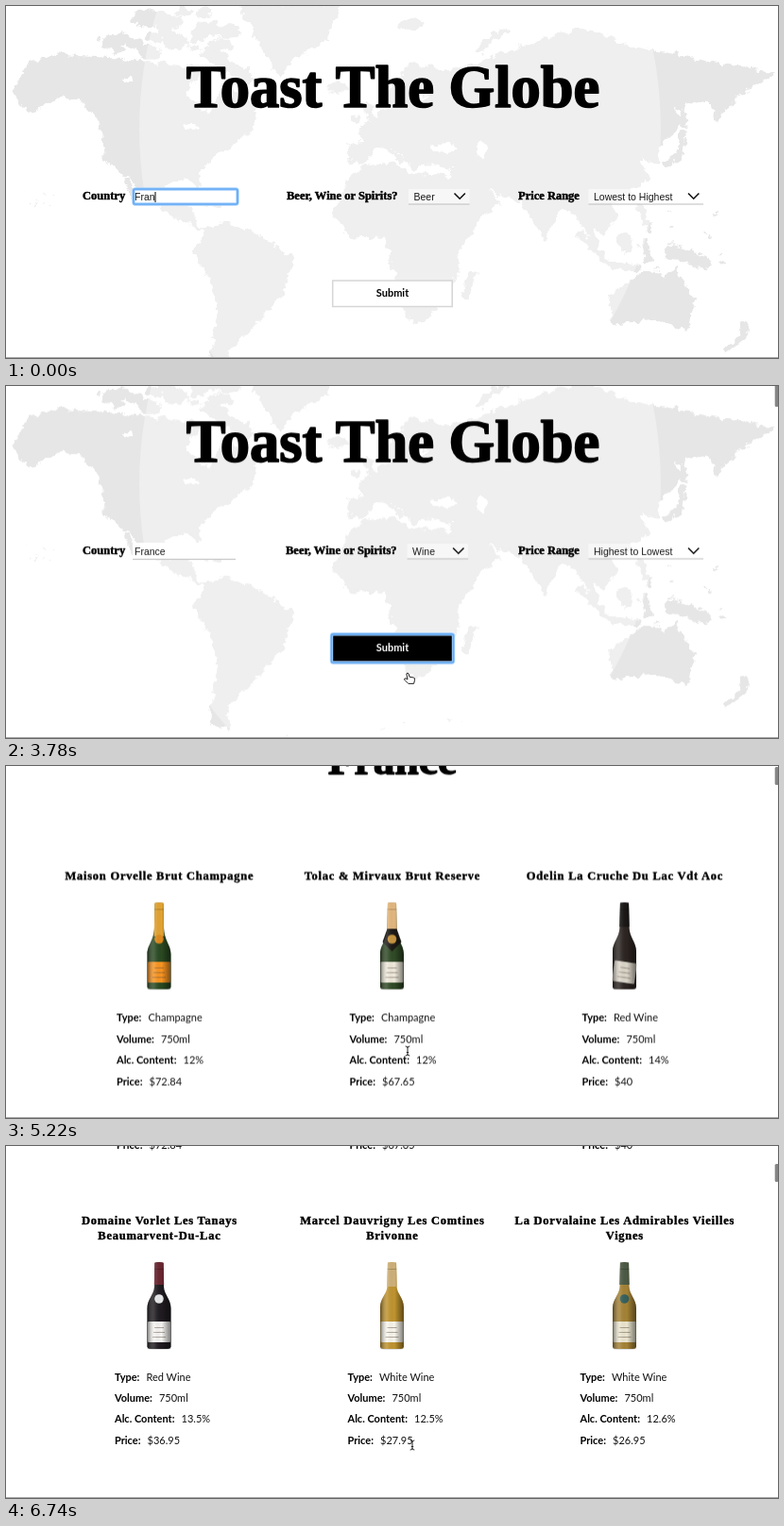
Write an HTML page that moves like this. It is 817 by 373 pixels and loops after 6.76 s.

```html
<!DOCTYPE html>
<html lang="en">
<head>
<meta charset="utf-8">
<title>Toast The Globe</title>
<style>
  html, body { margin: 0; width: 100%; height: 100%; overflow: hidden; background: #fff; }
  #stage { position: relative; width: 817px; height: 373px; overflow: hidden; background: #fff; }
  svg { position: absolute; left: 0; top: 0; display: block; }
  #page { position: absolute; left: 0; top: 0; width: 817px; height: 1250px; will-change: transform; }
  .serif { font-family: "Liberation Serif", "Times New Roman", serif; font-weight: 700; stroke: #000; stroke-linejoin: round; }
  .title { font-size: 62.5px; stroke-width: 1.7px; }
  .head { font-size: 45.5px; stroke-width: 1.3px; }
  .label { font-size: 12.5px; stroke-width: .45px; }
  .name { font-size: 12.5px; stroke-width: .4px; letter-spacing: .75px; }
  .field { font-family: "Liberation Sans", Arial, sans-serif; font-size: 10.5px; fill: #1a1a1a; }
  .info { font-family: Lato, sans-serif; font-size: 11px; fill: #111; }
  .bold { font-weight: 700; fill: #000; }
  .mid { text-anchor: middle; }
</style>
</head>
<body>
<div id="stage">
  <div id="page">
    <svg id="map" width="817" height="430">
      <filter id="coast" x="0" y="0" width="817" height="430" filterUnits="userSpaceOnUse" color-interpolation-filters="sRGB">
        <feTurbulence type="fractalNoise" baseFrequency=".11" numOctaves="4" seed="4"/>
        <feDisplacementMap in="SourceGraphic" scale="11" xChannelSelector="R" yChannelSelector="G"/>
      </filter>
    </svg>
    <svg id="ui" width="817" height="1250">
      <linearGradient id="shade">
        <stop offset="0" stop-opacity=".5"/>
        <stop offset=".3" stop-color="#fff" stop-opacity=".14"/>
        <stop offset=".6" stop-opacity="0"/>
        <stop offset="1" stop-opacity=".5"/>
      </linearGradient>
    </svg>
  </div>
  <svg id="top" width="817" height="373"></svg>
</div>
<script>
const LOOP = 6760;
const $ = id => document.getElementById(id);

function add(parent, tag, attrs = {}, text) {
  const el = document.createElementNS("http://www.w3.org/2000/svg", tag);
  for (const k in attrs) el.setAttribute(k, attrs[k]);
  if (text !== undefined) el.textContent = text;
  parent.append(el);
  return el;
}
const rect = (p, x, y, width, height, fill, more) => add(p, "rect", { x, y, width, height, fill, ...more });
const label = (p, x, y, cls, str, more) => add(p, "text", { x, y, class: cls, ...more }, str);
const show = (el, on) => el.setAttribute("visibility", on ? "visible" : "hidden");

let seed = 11;
function random(min, max) {
  seed = seed * 16807 % 2147483647;
  return min + (max - min) * seed / 2147483647;
}

// ---- World map: rough outlines, frayed by noise ----
const LAND = "#e6e6e6";
const map = add($("map"), "g", { filter: "url(#coast)", "stroke-linejoin": "round", "stroke-linecap": "round" });
const land = points => add(map, "polygon", { points, fill: LAND, stroke: LAND, "stroke-width": 3 });
const strip = (width, d) => add(map, "path", { d, fill: "none", stroke: LAND, "stroke-width": width });
const lake = (cx, cy, rx, ry) => add(map, "ellipse", { cx, cy, rx, ry, fill: "#fff" });
function isles(count, x, y, w, h, size) {
  for (let i = 0; i < count; i++) {
    const r = random(size / 2, size);
    add(map, "ellipse", { cx: random(x, x + w), cy: random(y, y + h), rx: r, ry: r * .55, fill: LAND });
  }
}
// The Americas
land("8,90 25,62 52,53 118,57 206,67 188,94 216,118 232,82 266,112 256,134 220,158 202,178 206,193 194,182 166,188 172,212 192,206 203,234 214,238 178,224 130,182 106,162 105,136 84,100 60,94 24,112");
land("248,0 352,0 336,38 302,56 291,74 272,46");
land("212,238 232,229 262,241 303,267 292,306 268,330 234,366 236,390 216,384 224,330 222,302 200,260");
// Africa, Eurasia, Australia
land("362,186 378,172 410,166 424,178 466,182 484,216 504,220 476,264 478,282 444,333 430,335 416,298 402,243 364,244 347,220");
land("364,164 362,148 382,146 374,132 404,110 436,102 456,92 440,92 428,108 398,100 428,62 470,70 512,58 548,44 610,24 660,44 813,72 772,96 752,122 746,100 704,108 716,122 690,150 690,168 668,156 680,182 640,210 646,224 632,240 618,228 628,262 606,222 588,212 570,246 546,206 502,192 522,206 494,232 470,188 474,172 444,166 432,172 408,147 386,152 380,166");
land("640,308 676,282 692,284 694,292 708,278 728,314 718,342 688,330 644,336");
// Long islands and peninsulas
strip(14, "M214 50L256 76");
strip(5, "M128 186L136 204M204 205L228 211M402 148L418 164M716 106L717 128");
strip(9, "M383 106L388 126M369 121h2M344 86h14M494 284L486 306M418 20L436 18");
strip(6, "M698 168Q716 162 716 136M502 48Q510 32 530 25M671 212L680 236M676 250L680 268M782 336L780 350 760 365");
strip(7, "M608 242L636 270M638 274L668 278");
strip(14, "M654 246L656 256M704 260Q722 263 740 273");
isles(26, 112, 6, 122, 48, 14);
isles(14, 650, 210, 110, 80, 3);
isles(8, 20, 195, 40, 20, 1.5);
isles(6, 245, 370, 310, 35, 2);
// Inland seas
lake(464, 150, 14, 5);
lake(503, 153, 5, 11);
lake(196, 128, 9, 3);
lake(130, 78, 5, 3);
add($("map"), "ellipse", { cx: 417, cy: 130, rx: 276, ry: 345, fill: "#fff", opacity: .33 });

// ---- Search form ----
const ui = $("ui");
function ring(x, y, w, h) {
  const g = add(ui, "g");
  rect(g, x, y, w, h, "none", { stroke: "#a9d1fb", "stroke-width": 3.4, rx: 2 });
  rect(g, x, y, w, h, "none", { stroke: "#62aaf5", "stroke-width": 1.7, rx: 1.5 });
  return g;
}
function select(x, w, str) {
  const g = add(ui, "g");
  rect(g, x, 194, w, 16, "#fff", { opacity: .5 });
  rect(g, x, 209.5, w, 1, "#bdbdbd");
  add(g, "path", { d: `M${x + w - 16} 198.5l5.7 5.7 5.7-5.7`, fill: "none", stroke: "#111", "stroke-width": 1.6 });
  return { g, text: label(g, x + 5.5, 206, "field", str) };
}

label(ui, 409.5, 107, "serif title mid", "Toast The Globe");
label(ui, 81, 205, "serif label", "Country");
rect(ui, 134, 193, 109, 17, "#fff");
rect(ui, 134, 210, 109, 1, "#bdbdbd");
const country = label(ui, 136, 206, "field", "");
const countryRing = ring(135, 194, 110, 16);
const caret = rect(ui, 158, 197, 1, 11, "#000");

const drinkLabel = label(ui, 297, 205, "serif label", "Beer, Wine or Spirits?");
const drink = select(426, 64.5, "Beer");
const drinkRing = ring(425, 194.5, 64, 16);

label(ui, 542, 205, "serif label", "Price Range");
const price = select(616.5, 121.5, "");
const priceRing = ring(616.5, 194.5, 121, 16);

const button = rect(ui, 345.7, 291, 126.5, 27.5, "#fff", { stroke: "#d6d6d6", "stroke-width": 1.5 });
const buttonRing = ring(344.5, 289.8, 129, 30.2);
const buttonText = label(ui, 409, 307.8, "info mid bold", "Submit");

function makeMenu(x, w, items) {
  const g = add(ui, "g");
  const h = items.length * 14 + 8;
  for (let i = 3; i > 0; i--) rect(g, x - i, 193 - i, w + 2 * i, h + 2 * i, "#000", { rx: 4 + i, opacity: .06 });
  rect(g, x, 192, w, h, "#f1f1f1", { rx: 4, stroke: "#c4c4c4", "stroke-width": .6 });
  const bar = rect(g, x, 196, w, 14, "#3f8ff7");
  const rows = items.map((s, i) => label(g, x + 13.5, 206 + i * 14, "field", s));
  const tick = add(g, "path", { d: `M${x + 4.5} 202.5l1.8 3 3-6.5`, fill: "none", "stroke-width": 1.2 });
  return (open, pick) => {
    show(g, open);
    show(bar, open && pick >= 0);
    bar.setAttribute("y", 195.5 + Math.max(pick, 0) * 14);
    rows.forEach((r, i) => r.style.fill = i === pick ? "#fff" : "");
    tick.setAttribute("stroke", pick === 0 ? "#fff" : "#222");
  };
}
const drinkMenu = makeMenu(417.5, 70, ["Beer", "Wine", "Spirits"]);
const priceMenu = makeMenu(609, 123, ["Lowest to Highest", "Highest to Lowest"]);

// ---- Results ----
label(ui, 409, 496, "serif head mid", "France");

function bottle(cx, y, { glass, foil, neck, shoulder, seal, paper, tilt = 0, collar }) {
  const g = add(ui, "g", { transform: `translate(${cx} ${y})` });
  const s = shoulder;
  const d = `M-4.5 1Q0-.5 4.5 1L5 26C5.5 ${s - 14} 12.5 ${s - 10} 12.5 ${s}V90Q12 92 9 92H-9Q-12 92-12.5 90V${s}C-12.5 ${s - 10}-5.5 ${s - 14}-5 26Z`;
  add(g, "ellipse", { cx: 0, cy: 91.5, rx: 13, ry: 1.6, fill: "#ddd" });
  add(g, "path", { d, fill: glass });
  add(g, "path", { d: `M-4.6 .6Q0-.6 4.6 .6L5.2 ${neck}H-5.2Z`, fill: foil });
  rect(g, -4.8, 7, 9.6, .8, "#000", { opacity: .25 });
  if (collar) add(g, "path", { d: "M-5 28L5 28 10 42 0 52-10 42Z", fill: collar });
  if (seal) add(g, "circle", { cx: 0, cy: 39, r: 4.8, fill: seal });
  const tag = add(g, "g", { transform: `rotate(${tilt} 0 74)` });
  rect(tag, -12, 63, 24, 22, paper, { rx: 1 });
  for (let i = 0; i < 3; i++) rect(tag, -5 - i, 69 + i * 5, 10 + 2 * i, 1, "#55483a", { opacity: .45 });
  add(g, "path", { d, fill: "url(#shade)" });
}

const columns = [162, 408.5, 654.5];
const products = [
  { name: ["Maison Orvelle Brut Champagne"], info: ["Champagne", "750ml", "12%", "$72.84"],
    bottle: { glass: "#2a4a22", foil: "#e3a432", neck: 36, shoulder: 55, seal: "#e08a1c", paper: "#f99420" } },
  { name: ["Tolac & Mirvaux Brut Reserve"], info: ["Champagne", "750ml", "12%", "$67.65"],
    bottle: { glass: "#304a26", foil: "#e4b87e", neck: 30, shoulder: 55, collar: "#1d1a16", seal: "#c9963f", paper: "#efeadb" } },
  { name: ["Odelin La Cruche Du Lac Vdt Aoc"], info: ["Red Wine", "750ml", "14%", "$40"],
    bottle: { glass: "#2b2421", foil: "#191615", neck: 26, shoulder: 52, paper: "#dcd6ca", tilt: 8 } },
  { name: ["Domaine Vorlet Les Tanays", "Beaumarvent-Du-Lac"], info: ["Red Wine", "750ml", "13.5%", "$36.95"],
    bottle: { glass: "#1f1b20", foil: "#6a2630", neck: 24, shoulder: 49, seal: "#e6e8ea", paper: "#f6f4f2" } },
  { name: ["Marcel Dauvrigny Les Comtines", "Brivonne"], info: ["White Wine", "750ml", "12.5%", "$27.95"],
    bottle: { glass: "#c0942f", foil: "#cfb178", neck: 26, shoulder: 48, paper: "#f8f5ec" } },
  { name: ["La Dorvalaine Les Admirables Vieilles", "Vignes"], info: ["White Wine", "750ml", "12.6%", "$26.95"],
    bottle: { glass: "#a58335", foil: "#4b5a44", neck: 24, shoulder: 49, seal: "#35605c", paper: "#ece6d0" } }
];
products.forEach((p, n) => {
  const cx = columns[n % 3], row = Math.floor(n / 3);
  p.name.forEach((s, i) => label(ui, cx + .4, 607.5 + row * 298.5 + i * 16, "serif name mid", s));
  bottle(cx, 632 + row * 314, p.bottle);
  ["Type:", "Volume:", "Alc. Content:", "Price:"].forEach((key, i) => {
    const line = label(ui, cx - 45 - row * 2, 758.3 + row * 313.2 + i * 22.4, "info");
    add(line, "tspan", { class: "bold" }, key);
    add(line, "tspan", { dx: 7 }, p.info[i]);
  });
});

// ---- Window edge, scrollbar, pointer ----
const overlay = $("top");
const thumb = rect(overlay, 813.7, 0, 4, 19, "#858585", { rx: 1.5 });
rect(overlay, 0, 372, 817, 1, "#a8a8a8");
const pointer = add(overlay, "g");
const shapes = {
  arrow: add(pointer, "path", { d: "M0 0V10.2L2.4 8.1 4 11.6 5.7 10.8 4.2 7.4H7.4Z", stroke: "#fff", "stroke-width": .8 }),
  hand: add(pointer, "path", { d: "M-1.2 2.8Q0 1.4 1 2.8L2 6.2 6.6 7Q7.8 7.6 7.6 9.4L6.6 13.4H.8L-3.4 9.2Q-3.6 7.6-2 7.8L0 9Z", fill: "#fff", stroke: "#222" }),
  beam: add(pointer, "path", { d: "M-2.3-5Q0-5 0-3.5Q0-5 2.3-5M0-4V4M-2.3 5Q0 5 0 3.5Q0 5 2.3 5M-1.2 1.5H1.2", fill: "none", stroke: "#222" })
};

// ---- Timeline ----
const within = (t, a, b) => t >= a && t < b;
// Goes from 0 to 1 between times a and b, slow at both ends.
function ease(t, a, b) {
  const k = Math.min(1, Math.max(0, (t - a) / (b - a)));
  return .5 - Math.cos(Math.PI * k) / 2;
}
const scrollAt = t => 373 * ease(t, 3657, 4374) + 114.5 * ease(t, 4720, 5220) +
  262 * ease(t, 5400, 6060) + 73.5 * ease(t, 6060, 6600);

// Where the pointer rests, and when it gets there.
const stops = [
  { t: 0, x: 200, y: 214 }, { t: 760, x: 446, y: 206 }, { t: 1120, x: 446, y: 215 }, { t: 1900, x: 660, y: 203 },
  { t: 2440, x: 637, y: 213 }, { t: 3340, x: 425, y: 302 }, { t: 6560, x: 430, y: 317 }
];
function pointerAt(t) {
  return stops.reduce((p, s) => {
    const k = ease(t, s.t - 400, s.t);
    return { x: p.x + (s.x - p.x) * k, y: p.y + (s.y - p.y) * k };
  });
}

function render(t) {
  const s = scrollAt(t);
  $("page").style.transform = `translateY(${-s}px)`;

  const typed = "France".slice(0, t < 120 ? 4 : t < 260 ? 5 : 6);
  country.textContent = typed;
  show(countryRing, t < 800);
  show(caret, t < 700);
  caret.setAttribute("x", 157.5 + (typed.length - 4) * 5.5);

  const wine = t >= 1320;
  drink.text.textContent = wine ? "Wine" : "Beer";
  drinkLabel.setAttribute("x", wine ? 296 : 297);
  drink.g.setAttribute("transform", `translate(${wine ? -1.4 : 0} 0)`);
  show(drinkRing, within(t, 800, 1960));
  drinkMenu(within(t, 800, 1320), within(t, 1200, 1260) ? -1 : t < 1060 ? 0 : 1);

  price.text.textContent = t < 2740 ? "Lowest to Highest" : "Highest to Lowest";
  show(priceRing, within(t, 1960, 3540));
  priceMenu(within(t, 1960, 2740), within(t, 2620, 2680) ? -1 : t < 2330 ? 0 : 1);

  const dark = t >= 3280;
  button.setAttribute("fill", dark ? "#000" : "#fff");
  button.setAttribute("stroke", dark ? "#000" : "#d6d6d6");
  buttonText.style.fill = dark ? "#fff" : "#000";
  show(buttonRing, t >= 3540);

  const early = s < 150;
  show(thumb, t >= 3670);
  thumb.setAttribute("y", early ? -1 : 15 + (s - 749.5) * .053);
  thumb.setAttribute("height", early ? 23 : 19);

  const kind = within(t, 3280, 3900) ? "hand" : t < 600 || t >= 4900 ? "beam" : "arrow";
  const { x, y } = pointerAt(t);
  pointer.setAttribute("transform", `translate(${x} ${y})`);
  for (const k in shapes) show(shapes[k], k === kind && t >= 480);
}

const start = performance.now();
function tick() {
  render((performance.now() - start) % LOOP);
  requestAnimationFrame(tick);
}
render(0);
requestAnimationFrame(tick);
</script>
</body>
</html>
```
